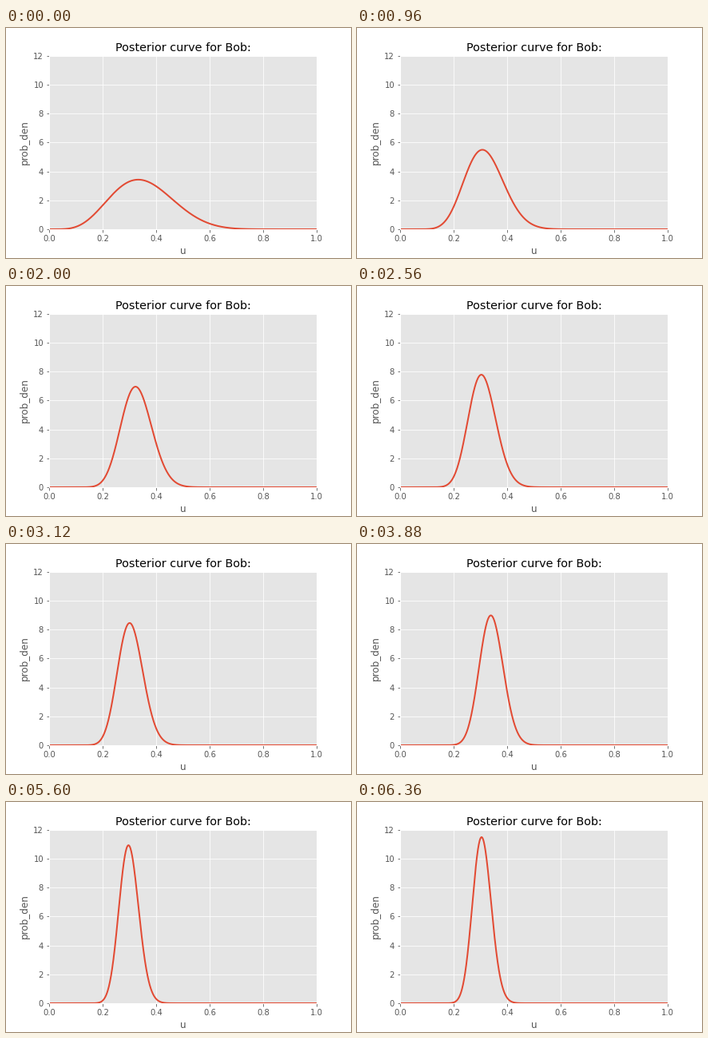
A matplotlib script for the animation above (6.4 s loop, 432 px wide and 288 px high).

```python
from math import comb

import matplotlib.pyplot as plt
import numpy as np
from matplotlib.animation import FuncAnimation

FRAMES, INTERVAL = 160, 40
FIRST_TRIAL = 15

# (trials, successes) where the success rate shifts; steady in between
RATE_SHIFTS = [(15, 5), (19, 5), (33, 10), (49, 16), (66, 21), (93, 28),
               (112, 38), (135, 40), (151, 44), (174, 53)]

u = np.linspace(0, 1, 1000)


def posterior(n):
    """Beta density under a flat prior after n trials."""
    k = round(np.interp(n, *zip(*RATE_SHIFTS)))
    return (n + 1) * float(comb(n, k)) * u**k * (1 - u)**(n - k)


plt.style.use("ggplot")
plt.rcParams.update({"font.family": "DejaVu Sans", "toolbar": "None"})

fig = plt.figure(figsize=(6, 4), dpi=72, facecolor="white")
ax = fig.add_axes([0.125, 0.125, 0.775, 0.755])
ax.set(xlim=(0, 1), ylim=(0, 12), xlabel="u", ylabel="prob_den",
       xticks=np.linspace(0, 1, 6), yticks=range(0, 13, 2))
ax.set_title("Posterior curve for Bob:")
curve, = ax.plot(u, posterior(FIRST_TRIAL), color="#E24A33", lw=2)


def update(i):
    curve.set_ydata(posterior(FIRST_TRIAL + i))  # one more trial per frame
    return curve,


anim = FuncAnimation(fig, update, frames=FRAMES, interval=INTERVAL,
                     init_func=lambda: update(0), repeat=True, repeat_delay=0)
plt.show()
```
